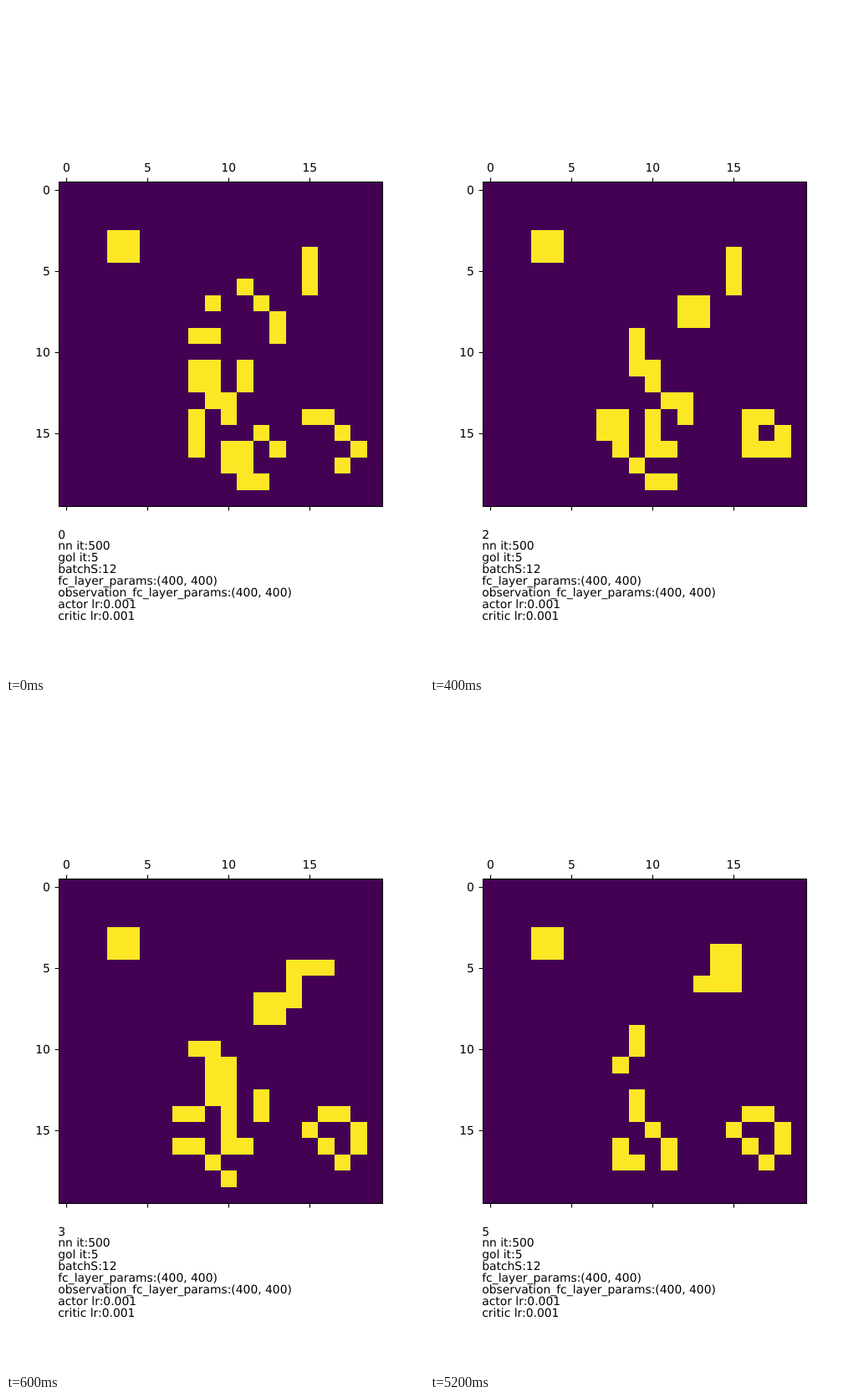
An HTML page that plays this animation: 500 by 800 pixels, repeating every 8000 ms.

```html
<!DOCTYPE html>
<html lang="en">
<head>
<meta charset="utf-8">
<title>Game of Life</title>
<style>
  html, body { margin: 0; width: 100%; height: 100%; overflow: hidden; background: #fff; }
  svg { display: block; width: 500px; height: 800px; }
  text { font: 13.889px "DejaVu Sans", sans-serif; text-rendering: geometricPrecision; white-space: pre; }
  .cells { shape-rendering: crispEdges; }
  .lines { fill: none; stroke: #000; stroke-width: 1.11; stroke-linecap: butt; }
</style>
</head>
<body>
<svg viewBox="0 0 500 800">
  <rect x="63" y="210" width="388" height="388" fill="#440154"/>
  <path id="live" class="cells" fill="#fde725"/>
  <path id="ticks" class="lines"/>
  <rect class="lines" x="63.5" y="210.5" width="387" height="388"/>
  <g id="labels"></g>
</svg>
<script>
const SIZE = 20, LEFT = 63, TOP = 210, CELL = 19.4;
const STEP_MS = 200, LAST_STEP = 5, LOOP_MS = 8000;

// Live columns of the first generation, by row.
const seed = {
  3: [3, 4], 4: [3, 4, 15], 5: [15], 6: [11, 15], 7: [9, 12], 8: [13], 9: [8, 9, 13],
  11: [8, 9, 11], 12: [8, 9, 11], 13: [9, 10], 14: [8, 10, 15, 16], 15: [8, 12, 17],
  16: [8, 10, 11, 13, 18], 17: [10, 11, 17], 18: [11, 12]
};

const makeGrid = rule => Array.from({ length: SIZE }, (_, r) =>
  Array.from({ length: SIZE }, (_, c) => rule(r, c)));

function neighbours(grid, r, c) {
  let count = 0;
  for (let y = r - 1; y <= r + 1; y++)
    for (let x = c - 1; x <= c + 1; x++)
      if ((y !== r || x !== c) && grid[y][x]) count++;
  return count;
}

// The outermost ring of cells always stays dead.
const isEdge = i => i === 0 || i === SIZE - 1;
const evolve = grid => makeGrid((r, c) => {
  if (isEdge(r) || isEdge(c)) return false;
  const n = neighbours(grid, r, c);
  return n === 3 || (n === 2 && grid[r][c]);
});

const edge = (start, i) => start + Math.round(i * CELL);

function cellPath(grid) {
  let d = "";
  grid.forEach((row, r) => row.forEach((alive, c) => {
    if (alive) d += `M${edge(LEFT, c)} ${edge(TOP, r)}H${edge(LEFT, c + 1)}V${edge(TOP, r + 1)}H${edge(LEFT, c)}Z`;
  }));
  return d;
}

const labels = document.getElementById("labels");
function addText(content, x, y, anchor = "start") {
  const node = document.createElementNS("http://www.w3.org/2000/svg", "text");
  node.setAttribute("x", x);
  node.setAttribute("y", y);
  node.setAttribute("text-anchor", anchor);
  node.textContent = content;
  labels.append(node);
  return node;
}

let tickPath = "";
for (let n = 0; n < SIZE; n += 5) {
  const x = 72.5 + n * CELL, y = 220.5 + n * CELL;
  tickPath += `M${x} 205.5V210.5M${x} 598.5V603.5M58.5 ${y}H63.5`;
  addText(n, x - 0.2, 198, "middle");
  addText(n, 52.8, y + 4.5, "end");
}
document.getElementById("ticks").setAttribute("d", tickPath);

const counter = addText("0", 62.2, 637);
[
  "nn it:500",
  "gol it:5",
  "batchS:12",
  "fc_layer_params:(400, 400)",
  "observation_fc_layer_params:(400, 400)",
  "actor lr:0.001",
  "critic lr:0.001"
].forEach((line, i) => addText(line, 62.2, 650 + 14 * i));

const generations = [];
let grid = makeGrid((r, c) => (seed[r] || []).includes(c));
for (let i = 0; i <= LAST_STEP; i++) {
  generations.push(cellPath(grid));
  grid = evolve(grid);
}

const live = document.getElementById("live");
let shown = -1;
function show(step) {
  if (step === shown) return;
  shown = step;
  live.setAttribute("d", generations[step]);
  counter.textContent = step;
}

show(0);
const start = performance.now();
function tick() {
  const t = (performance.now() - start) % LOOP_MS;
  show(Math.min(LAST_STEP, Math.floor(t / STEP_MS)));
  requestAnimationFrame(tick);
}
requestAnimationFrame(tick);
</script>
</body>
</html>
```
